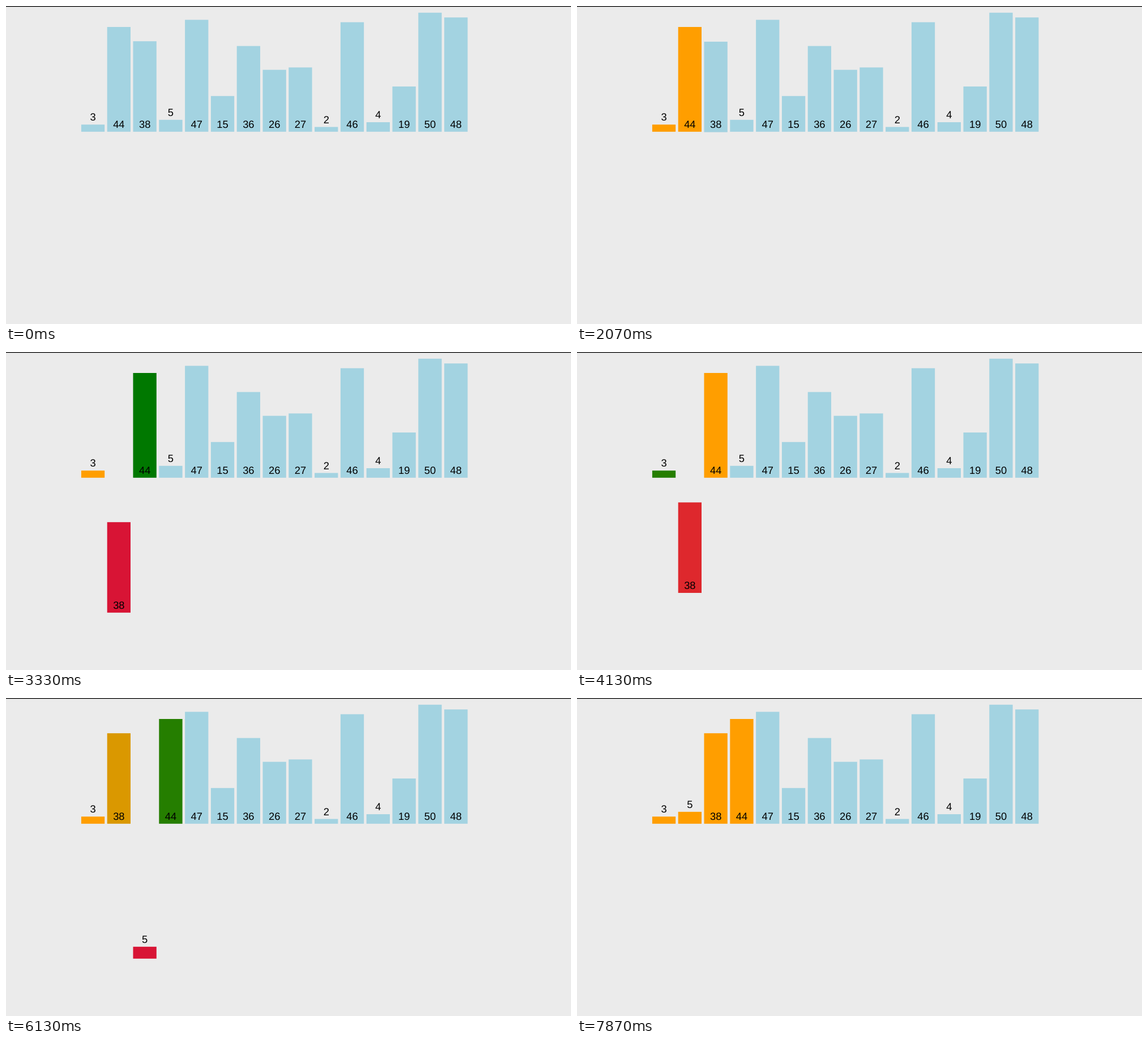
Animation of 998 by 561 pixels, one loop 8 s. Source, as an HTML page:

```html
<!DOCTYPE html>
<html lang="en">
<head>
<meta charset="utf-8">
<title>Insertion sort</title>
<style>
  html, body { margin: 0; width: 100%; height: 100%; overflow: hidden; background: #ebebeb; }
  svg { display: block; width: 998px; height: 561px; }
  text {
    font: 18.33px "Liberation Sans", Arial, sans-serif;
    text-anchor: middle;
    text-rendering: geometricPrecision;
  }
</style>
</head>
<body>
<svg id="stage" viewBox="0 0 998 561">
  <rect width="998" height="1.3" fill="#000"/>
</svg>
<script>
const LOOP = 8000, FIRST = 48, PERIOD = 500, DURATION = 250;
const LEFT = 132.9, PITCH = 45.8, WIDTH = 41.3, BASE = 221.8, DROP = 238, UNIT = 4.2;

const BLUE = [163, 211, 225], ORANGE = [255, 158, 0];
const GREEN = [0, 120, 0], RED = [216, 20, 53];

const values = [3, 44, 38, 5, 47, 15, 36, 26, 27, 2, 46, 4, 19, 50, 48];

const paint = color => ({ color });
const lower = { color: RED, row: 1 };
const raise = { color: ORANGE, row: 0 };
const toSlot = slot => ({ slot });

// One entry per step: bar value -> properties that change
const steps = [
  { 3: paint(ORANGE) },
  { 44: lower },
  { 3: paint(GREEN) },
  { 3: paint(ORANGE), 44: raise },
  { 38: lower },
  { 44: paint(GREEN) },
  { 44: toSlot(2), 38: toSlot(1) },
  { 44: paint(ORANGE), 3: paint(GREEN) },
  { 3: paint(ORANGE), 38: raise },
  { 5: lower },
  { 44: paint(GREEN) },
  { 44: toSlot(3), 5: toSlot(2) },
  { 44: paint(ORANGE), 38: paint(GREEN) },
  { 38: toSlot(2), 5: toSlot(1) },
  { 38: paint(ORANGE), 3: paint(GREEN) },
  { 3: paint(ORANGE), 5: raise }
];

const stage = document.getElementById("stage");

function add(parent, tag, attrs) {
  const node = document.createElementNS("http://www.w3.org/2000/svg", tag);
  for (const key in attrs) node.setAttribute(key, attrs[key]);
  return parent.appendChild(node);
}

const bars = values.map((value, slot) => {
  const height = value * UNIT;
  const group = add(stage, "g", {});
  const rect = add(group, "rect", { y: -height, width: WIDTH, height });
  const labelY = height < 25 ? -height - 6.9 : -7.1;
  add(group, "text", { x: WIDTH / 2, y: labelY }).textContent = value;
  return { value, slot, group, rect };
});

const ease = t => t < 0.5 ? 4 * t ** 3 : 1 - 4 * (1 - t) ** 3;
const mix = (a, b, k) => a + (b - a) * k;

function poseAt(bar, time) {
  let { slot } = bar, row = 0, color = BLUE;
  steps.forEach((step, i) => {
    const change = step[bar.value];
    const progress = (time - FIRST - i * PERIOD) / DURATION;
    if (!change || progress <= 0) return;
    const k = ease(Math.min(1, progress));
    slot = mix(slot, change.slot ?? slot, k);
    row = mix(row, change.row ?? row, k);
    color = color.map((c, j) => mix(c, (change.color ?? color)[j], k));
  });
  return { slot, row, color };
}

function draw(time) {
  for (const bar of bars) {
    const { slot, row, color } = poseAt(bar, time);
    bar.group.setAttribute("transform",
      `translate(${LEFT + slot * PITCH} ${BASE + row * DROP})`);
    bar.rect.setAttribute("fill", `rgb(${color.map(Math.round)})`);
  }
}

const start = performance.now();
function tick() {
  draw((performance.now() - start) % LOOP);
  requestAnimationFrame(tick);
}
draw(0);
tick();
</script>
</body>
</html>
```
